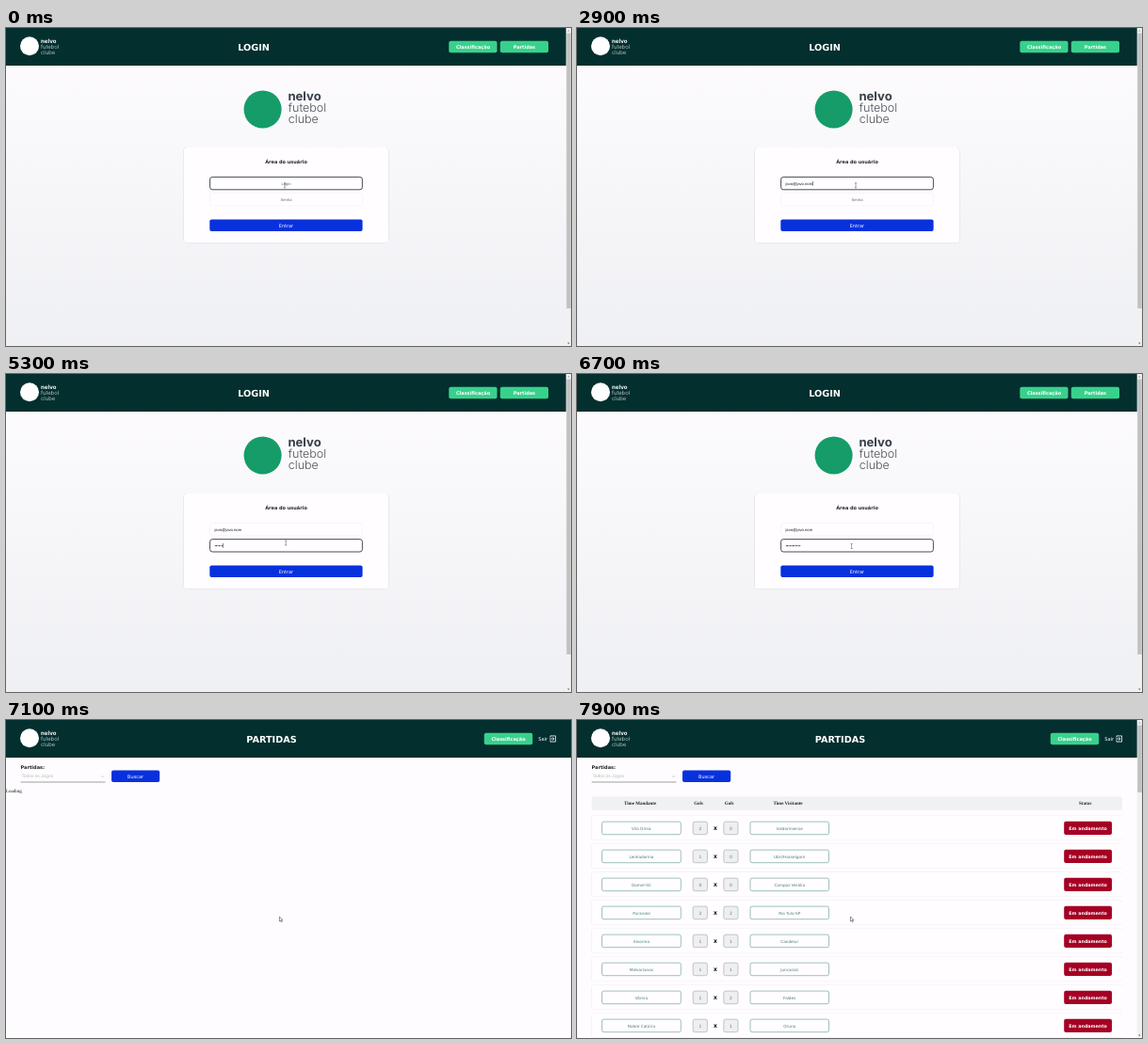
Write an HTML page that moves like this. It is 600 by 338 pixels and loops after 8000 ms.

```html
<!DOCTYPE html>
<html lang="pt-BR">
<head>
<meta charset="utf-8">
<title>Partidas</title>
<style>
  html, body { margin: 0; height: 100%; overflow: hidden; background: #fefcfe; }
  svg { display: block; width: 100vw; height: 100vh; text-rendering: geometricPrecision; }
  text { font-family: "DejaVu Sans", Verdana, sans-serif; font-size: 5px; }
  .mid { text-anchor: middle; }
  .bold { font-weight: 700; }
  .white { fill: #fff; }
  .title { font-size: 9.7px; }
  .club text { font-family: Inter, sans-serif; font-weight: 300; font-size: 12.5px; fill: #4b5058; }
  .club .bold { font-weight: 700; font-size: 13.1px; fill: #363e49; }
  .small text { font-size: 5.9px; fill: #dfe8e7; }
  .small .bold { font-size: 6.1px; fill: #fff; }
  .field { fill: #fffdff; stroke: #f2eff2; stroke-width: .6; }
  .field.focus { stroke: #2b2e33; stroke-width: .85; }
  .input { font-family: "Liberation Sans", Arial, sans-serif; font-size: 4.17px; fill: #222; }
  .hint { fill: #6c6c6c; }
  .green { fill: #38d18c; }
  .blue { fill: #0831de; }
  .head { font-family: "Liberation Serif", "Times New Roman", serif; fill: #222; }
  .load { font-family: "Liberation Serif", "Times New Roman", serif; fill: #111; }
  .team { fill: #fffdff; stroke: #5f958e; stroke-width: .6; }
  .goal { fill: #eeeff0; stroke: #9aa5a6; stroke-width: .6; }
  .name { font-size: 4.2px; fill: #4c7e77; }
  .score { font-size: 4.4px; fill: #666d70; }
  .status { fill: #a50024; }
  .card { filter: drop-shadow(0 .9px .35px rgba(0, 0, 0, .3)); }
  .row { fill: #fffdff; filter: drop-shadow(0 .6px .4px rgba(0, 0, 0, .16)); }
</style>
</head>
<body>
<svg viewBox="0 0 600 338" preserveAspectRatio="none">
  <defs>
    <linearGradient id="sky" x1="0" y1="0" x2="0" y2="1">
      <stop offset="0" stop-color="#fefcfe"/>
      <stop offset="1" stop-color="#eff0f4"/>
    </linearGradient>
    <g id="brand" class="club small">
      <circle cx="25" cy="19.3" r="10" fill="#fff"/>
      <text class="bold" x="37" y="16">nelvo</text>
      <text x="37" y="22">futebol</text>
      <text x="37" y="27.5">clube</text>
    </g>
    <g id="bar">
      <path d="M594.7 0h5.3v338h-5.3z" fill="#f2f1f2"/>
      <path d="M596.1 3.4l1.2-1.4 1.2 1.4z" fill="#999"/>
      <path d="M596.1 334.6l1.2 1.4 1.2-1.4z" fill="#555"/>
    </g>
  </defs>

  <g id="login">
    <rect width="600" height="338" fill="url(#sky)"/>
    <rect width="600" height="40" fill="#032f2e"/>
    <use href="#brand"/>
    <text class="title bold mid white" x="263" y="23.8">LOGIN</text>
    <rect class="green" x="470.3" y="13.75" width="51.2" height="12.5" rx="2"/>
    <text class="bold mid white" x="496" y="21.8">Classificação</text>
    <rect class="green" x="524.8" y="13.75" width="51.2" height="12.5" rx="2"/>
    <text class="bold mid white" x="550.4" y="21.8">Partidas</text>

    <g class="club">
      <circle cx="272.6" cy="86.5" r="20" fill="#159c69"/>
      <text class="bold" x="299.4" y="76.6">nelvo</text>
      <text x="299.8" y="89">futebol</text>
      <text x="299.8" y="101">clube</text>
    </g>

    <rect class="card" x="188.7" y="127" width="217.6" height="101.3" rx="3.5" fill="#fffdff"/>
    <text class="bold mid" x="297.5" y="143.8" fill="#222">Área do usuário</text>
    <rect id="mailBox" class="field" x="216.6" y="158.4" width="161.8" height="13.4" rx="2.6"/>
    <rect id="passBox" class="field" x="216.6" y="175.6" width="161.8" height="13.4" rx="2.6"/>
    <text id="mailHint" class="input hint mid" x="297.5" y="166.5">Login</text>
    <text id="passHint" class="input hint mid" x="297.5" y="183.8">Senha</text>
    <text id="mail" class="input" x="221.4" y="166.5"></text>
    <text id="pass" class="input" x="221.4" y="183.8"></text>
    <rect id="caret" width=".5" height="4.8" fill="#111"/>
    <rect class="blue" x="216.3" y="203.6" width="162.3" height="12.5" rx="2"/>
    <text class="mid white" x="297.4" y="211.8">Entrar</text>
    <use href="#bar"/>
    <rect x="595.3" y="5.5" width="4.4" height="292.5" fill="#c1c1c1"/>
  </g>

  <g id="matches">
    <rect width="600" height="338" fill="#fefcfe"/>
    <rect width="600" height="40" fill="#032f2e"/>
    <use href="#brand"/>
    <text id="title" class="title bold mid white" y="23.8">PARTIDAS</text>
    <g id="nav">
      <rect class="green" x="507.8" y="13.75" width="51.4" height="12.5" rx="2"/>
      <text class="bold mid white" x="533.5" y="21.8">Classificação</text>
      <text class="white" x="565.2" y="21.9" style="font-size:5.2px">Sair</text>
      <path d="M578 18.6v-1.7h5.6v6.2H578v-1.7M577.2 20h4.8m-1.5-1.6l1.6 1.6-1.6 1.6" fill="none" stroke="#fff" stroke-width=".8"/>
    </g>
    <text class="bold" x="15.6" y="51.9" fill="#222">Partidas:</text>
    <text class="input" x="16.4" y="61.4" style="font-size:4.85px;fill:#bbb">Todos os Jogos</text>
    <path d="M101.2 59.4l1.4 1.4 1.4-1.4" fill="none" stroke="#aaa" stroke-width=".6"/>
    <path d="M15.6 66h89.8" stroke="#85858a" stroke-width=".8"/>
    <rect class="blue" x="112" y="53.6" width="51.2" height="12.5" rx="2"/>
    <text class="mid white" x="137.6" y="61.6">Buscar</text>
    <text id="loading" class="load" x="0" y="76.8">Loading</text>
    <g id="table"></g>
  </g>

  <g id="pointer">
    <path id="beam" d="M-1-2.5h2M0-2.5v5M-1 2.5h2" fill="none" stroke="#444" stroke-width=".5"/>
    <path id="arrow" d="M-.6-2v5l1.2-1 .8 1.7.8-.4-.8-1.6h1.5z" fill="#fff" stroke="#222" stroke-width=".5"/>
  </g>
</svg>

<script>
const LOOP = 8000, OPEN = 7000, LOADED = 7200, FOCUS_PASS = 3700;
const MAIL = "javo@javo.nom";
const mailKeys = [300, 400, 600, 700, 1100, 1600, 1700, 1800, 1900, 2600, 2700, 2800, 2900];
const passKeys = [4600, 4700, 4900, 5100, 5200, 5300, 5500, 5600, 5700, 5900, 6100];
const caretOff = [[0, 300], [2300, 2600], [3200, 3700], [4200, 4600], [6600, 7000]];
// time, x, y
const moves = [[0, 296, 167.3], [3500, 296, 167.3], [3800, 297.2, 179.5], [6200, 297.2, 179.5],
  [6600, 291.6, 183], [6700, 291.6, 183], [6900, 291, 211], [LOOP, 291, 211]];
const games = [
  ["Vila Orma", 2, 0, "Valdoriniense"],
  ["Lenhadorina", 1, 0, "Ubri/Hasselgorn"],
  ["Dornel-SC", 0, 0, "Campos Verália"],
  ["Purandol", 2, 2, "Rio Tulo-SP"],
  ["Alvorino", 1, 1, "Candelur"],
  ["Melvorianos", 1, 1, "Juncarais"],
  ["Vôrnia", 1, 2, "Faldes"],
  ["Nobre Catúria", 1, 1, "Oruna"]
];

const $ = id => document.getElementById(id);
const box = (cls, x, y, w, h, r = 2) =>
  `<rect class="${cls}" x="${x}" y="${y}" width="${w}" height="${h}" rx="${r}"/>`;
const label = (cls, x, y, s) => `<text class="mid ${cls}" x="${x}" y="${y}">${s}</text>`;

function row([home, a, b, away], i) {
  const y = 115 + 30 * i, top = y - 6.9, base = y + 1.5;
  return box("row", 15.6, y - 13.3, 563.4, 26) +
    box("team", 26.5, top, 83.8, 13.6) + label("name", 68.4, base, home) +
    box("goal", 123.2, top, 15.2, 13.6) + label("score", 130.8, base, a) +
    label("bold", 147, y + 1.9, "X") +
    box("goal", 155.8, top, 15.2, 13.6) + label("score", 163.4, base, b) +
    box("team", 184, top, 83.5, 13.6) + label("name", 225.7, base, away) +
    box("status", 517.2, y - 7.3, 50.8, 14.3) +
    `<text class="mid bold white" x="542.6" y="${base}" style="font-size:4.8px">Em andamento</text>`;
}

const heads = [["Time Mandante", 67], ["Gols", 129], ["Gols", 161.7], ["Time Visitante", 224], ["Status", 539.7]];
$("table").innerHTML = `<rect x="15.6" y="81.6" width="563.4" height="14.4" rx="2" fill="#f0f1f2"/>` +
  heads.map(([s, x]) => label("head bold", x, 90.3, s)).join("") +
  games.map(row).join("") +
  `<use href="#bar"/><rect x="595.3" y="5.5" width="4.4" height="71.5" fill="#c1c1c1"/>`;

const show = (id, on) => $(id).setAttribute("visibility", on ? "inherit" : "hidden");
const set = (id, props) => { for (const k in props) $(id).setAttribute(k, props[k]); };
const typed = (keys, t) => keys.filter(k => k <= t).length;

function pointerAt(t) {
  const i = moves.findIndex(m => m[0] > t);
  const [t0, x0, y0] = moves[i - 1], [t1, x1, y1] = moves[i];
  const p = (t - t0) / (t1 - t0), e = p * p * (3 - 2 * p);
  return [x0 + (x1 - x0) * e, y0 + (y1 - y0) * e];
}

function draw(now) {
  const t = Math.floor(now / 100) * 100;
  const open = t >= OPEN, loaded = t >= LOADED, onPass = t >= FOCUS_PASS;
  show("login", !open);
  show("matches", open);
  show("table", loaded);
  show("loading", !loaded);
  set("title", { x: loaded ? 279.5 : 282 });
  set("nav", { transform: `translate(${loaded ? -5 : 0} 0)` });

  const m = typed(mailKeys, t), p = typed(passKeys, t);
  $("mail").textContent = MAIL.slice(0, m);
  $("pass").textContent = "•".repeat(p);
  show("mailHint", !m);
  show("passHint", !p);
  $("mailBox").classList.toggle("focus", !onPass);
  $("passBox").classList.toggle("focus", onPass);

  const field = $(onPass ? "pass" : "mail");
  const len = field.textContent ? field.getComputedTextLength() : 0;
  set("caret", { x: 221.4 + len, y: onPass ? 180 : 162.8 });
  show("caret", !caretOff.some(([a, b]) => t >= a && t < b));

  const [x, y] = pointerAt(t), inField = y < 189;
  set("pointer", { transform: `translate(${x} ${y})` });
  show("beam", inField);
  show("arrow", !inField);
}

function tick(now) {
  draw(now % LOOP);
  requestAnimationFrame(tick);
}
draw(0);
requestAnimationFrame(tick);
</script>
</body>
</html>
```
